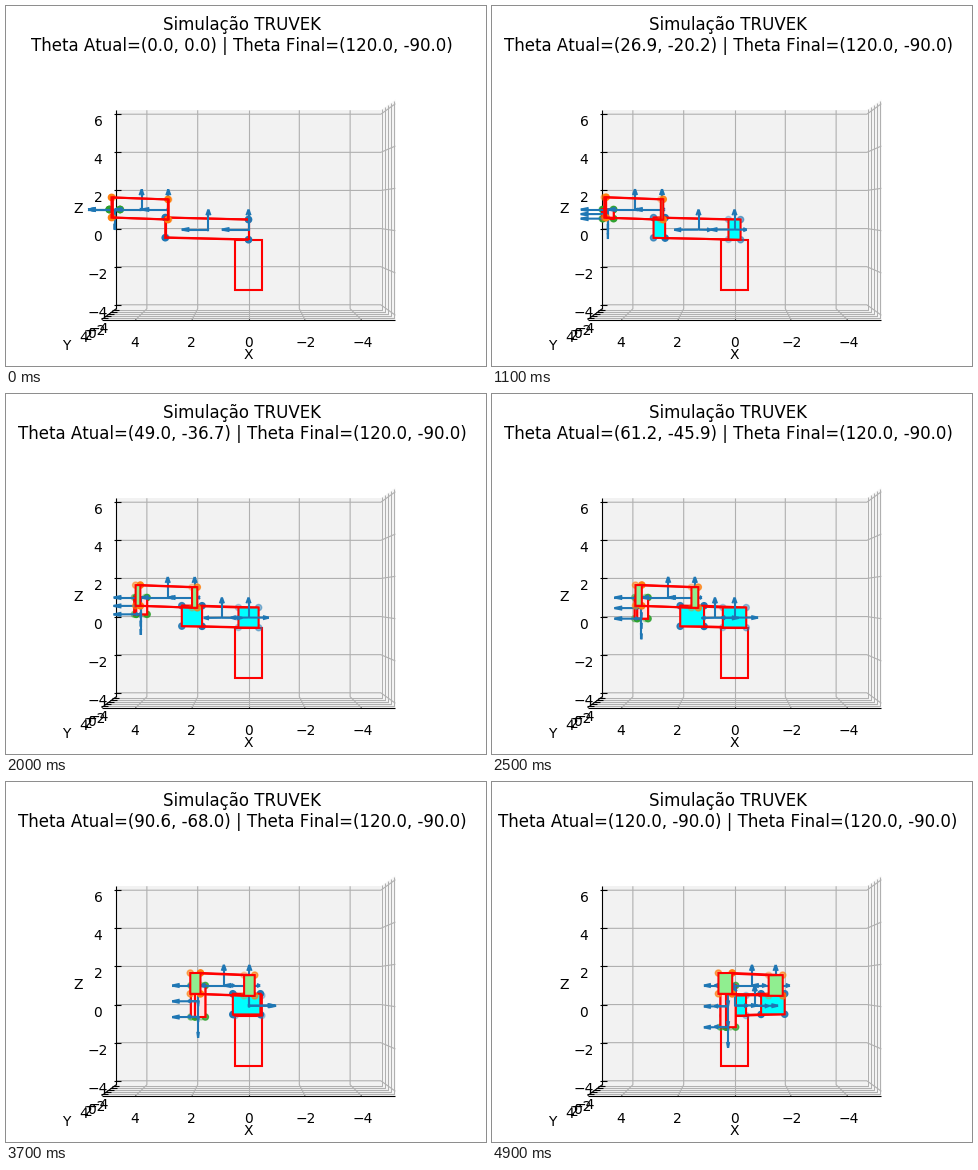
These frames come from a looping animation (480x360 px, 7900 ms). A matplotlib script:

```python
import numpy as np
import matplotlib.pyplot as plt
from matplotlib.animation import FuncAnimation
from matplotlib.collections import LineCollection
from matplotlib.colors import to_rgba

W, H, DPI = 480, 360, 100
STEPS, FRAMES = 49, 79
GOAL = np.array([120.0, -90.0])
REACH = 2.0                       # travel of the vertical joint
E = 5 + 10 / 48                   # padded half range of the box
TICKS = (-4, -2, 0, 2, 4)
FACE = [(-1, -1), (1, -1), (1, 1), (-1, 1)]
UP = np.array([0, 0, 1])
EDGE = 1.5

plt.rcParams["font.family"] = "DejaVu Sans"
plt.rcParams["text.kerning_factor"] = 6
fig = plt.figure(figsize=(W / DPI, H / DPI), dpi=DPI, facecolor="white")
ax = fig.add_axes([0, 0, 1, 1])
ax.set(xlim=(0, W), ylim=(H, 0))
ax.axis("off")


def project(pts):
    """Perspective view from +y, in pixels."""
    x, y, z = np.asarray(pts, float).T
    depth = 100 - y
    return np.column_stack([242.5 - 2673 * x / depth,
                            203.5 - 2005 * (z - 1) / depth])


def path(pts, color, lw, z):
    return ax.plot(*project(pts).T, color=color, lw=lw, zorder=z,
                   solid_capstyle="butt")[0]


def poly(pts, face, z, edge="red"):
    return ax.fill(*project(pts).T, facecolor=face, edgecolor=edge,
                   lw=EDGE, zorder=z)[0]


def label(x, y, text, size=10):
    return ax.text(x, y, text, size=size, ha="center", va="baseline")


def num(v):
    return str(v).replace("-", "\u2212")


def draw_box():
    lo, hi = 1 - E, 1 + E
    poly([(E, -E, lo), (-E, -E, lo), (-E, -E, hi), (E, -E, hi)],
         "#f2f2f2", 0, "none")
    poly([(-E, -E, lo), (-E, E, lo), (-E, E, hi), (-E, -E, hi)],
         "#f9f9f9", 0, "none")
    poly([(E, -E, lo), (-E, -E, lo), (-E, E, lo), (E, E, lo)],
         "#f5f5f5", 0, "none")

    out, inn = 0.087, 0.174
    for t in TICKS:
        path([(t, E, lo), (t, -E, lo), (t, -E, hi)], "#b0b0b0", 0.8, 1)
        path([(E, t, lo), (-E, t, lo), (-E, t, hi)], "#b0b0b0", 0.8, 1)
        path([(t, E + out, lo), (t, E - inn, lo)], "black", 0.8, 2)
        path([(E + out, t, lo), (E - inn, t, lo)], "black", 0.8, 2)
        label(242.7 - 28.6 * t, 340.6, num(t))
        near = (1 / (100 - t) - 1 / 104) / (1 / 96 - 1 / 104)
        label(93 - 15 * near, 327 + 9.5 * near, num(t))
    for z in range(-4, 7, 2):
        path([(E, -E, z), (-E, -E, z), (-E, E, z)], "#b0b0b0", 0.8, 1)
        path([(E + out, -E, z), (E - inn, -E, z)], "black", 0.8, 2)
        label(92, 234.6 - 19.06 * z, num(z))

    path([(E, E, lo), (-E, E, lo)], "black", 0.8, 2)
    path([(E, -E, lo), (E, E, lo)], "black", 0.8, 2)
    path([(E, -E, lo), (E, -E, hi)], "black", 0.8, 2)
    label(242.5, 353, "X")
    label(60.5, 344, "Y")
    label(72.5, 206.6, "Z")
    poly([(0.5, 0, -0.5), (-0.5, 0, -0.5), (-0.5, 0, -3), (0.5, 0, -3)],
         "none", 3)


def heading(a):
    c, s = np.cos(a), np.sin(a)
    return np.array([c, s, 0]), np.array([-s, c, 0])


def dots(pts, color, z):
    """Corner markers, fading with distance."""
    y = pts[:, 1]
    rgba = np.tile(to_rgba(color), (len(pts), 1))
    rgba[:, 3] = 1 - 0.7 * (y.max() - y) / max(np.ptp(y), 1e-6)
    return ax.scatter(*project(pts).T, s=20, c=rgba, zorder=z)


def link(start, a, length, face, color, z):
    u, v = heading(a)
    near = np.array([start + 0.5 * (i * v + j * UP) for i, j in FACE])
    far = near + length * u + np.array([0.1, 0, 0.1])
    parts = [dots(np.vstack([near, far]), color, z)]
    for p, q in zip(near, far):
        parts.append(path([p, q], "red", EDGE, z + 0.1))
    ends = sorted((near, far), key=lambda q: q[:, 1].mean())
    for k, q in enumerate(ends):
        parts.append(poly(q, face, z + 0.2 + 0.1 * k))
    return parts


def piston(top, a, drop, z):
    u, v = heading(a)
    upper = np.array([top + 0.2 * (i * u + j * v) for i, j in FACE])
    lower = upper - drop * UP
    parts = [dots(np.vstack([upper, lower]), "C2", z)]
    sides = []
    for k in range(4):
        m = (k + 1) % 4
        sides.append(np.array([upper[k], upper[m], lower[m], lower[k]]))
    sides.sort(key=lambda q: q[:, 1].mean())
    for k, q in enumerate(sides):
        parts.append(poly(q, "#ffe0e0", z + 0.1 + 0.05 * k))
    return parts


def arrow(p, d, side):
    """Shaft and two head strokes of a unit arrow."""
    tip = p + d
    c, s = 0.3 * np.cos(np.pi / 12), 0.3 * np.sin(np.pi / 12)
    return [project([p, tip]),
            project([tip - c * d + s * side, tip]),
            project([tip - c * d - s * side, tip])]


def triads(points, a, flip=1):
    u, v = heading(a)
    # heads of the downward arrows open along the tool's own y axis
    spread = np.array([1, 0, 0]) if flip > 0 else v
    axes = ((u, UP), (flip * v, UP), (flip * UP, spread))
    return [seg for p in points for d, side in axes
            for seg in arrow(p, d, side)]


draw_box()
label(236, 24, "Simulação TRUVEK", 12)
status = label(236, 45, "", 12)
moving = []


def update(n):
    while moving:
        moving.pop().remove()
    s = min(n, STEPS) / STEPS
    t1, t2 = GOAL * s + 0.0       # avoids a negative zero
    status.set_text(f"Theta Atual=({t1:.1f}, {t2:.1f}) | "
                    f"Theta Final=({GOAL[0]:.1f}, {GOAL[1]:.1f})")

    a, b = np.radians(t1), np.radians(t1 + t2)
    drop = REACH * s
    base = np.zeros(3)
    elbow = 3 * heading(a)[0]
    wrist = elbow + UP
    hand = wrist + 2 * heading(b)[0]
    tool = hand - drop * UP

    moving.extend(link(base, a, 3, "cyan", "C0", 4))
    moving.extend(piston(hand, b, drop, 5))
    segs = triads([base, elbow / 2], a)
    segs += triads([wrist, (wrist + hand) / 2], b)
    segs += triads([hand, (hand + tool) / 2, tool], b, -1)
    moving.append(ax.add_collection(
        LineCollection(segs, colors="C0", linewidths=1.5, zorder=6)))
    moving.extend(link(wrist, b, 2, "lightgreen", "C1", 7))
    return [status, *moving]


anim = FuncAnimation(fig, update, frames=FRAMES, interval=100,
                     repeat=True, repeat_delay=0, blit=False)
plt.show()
```
